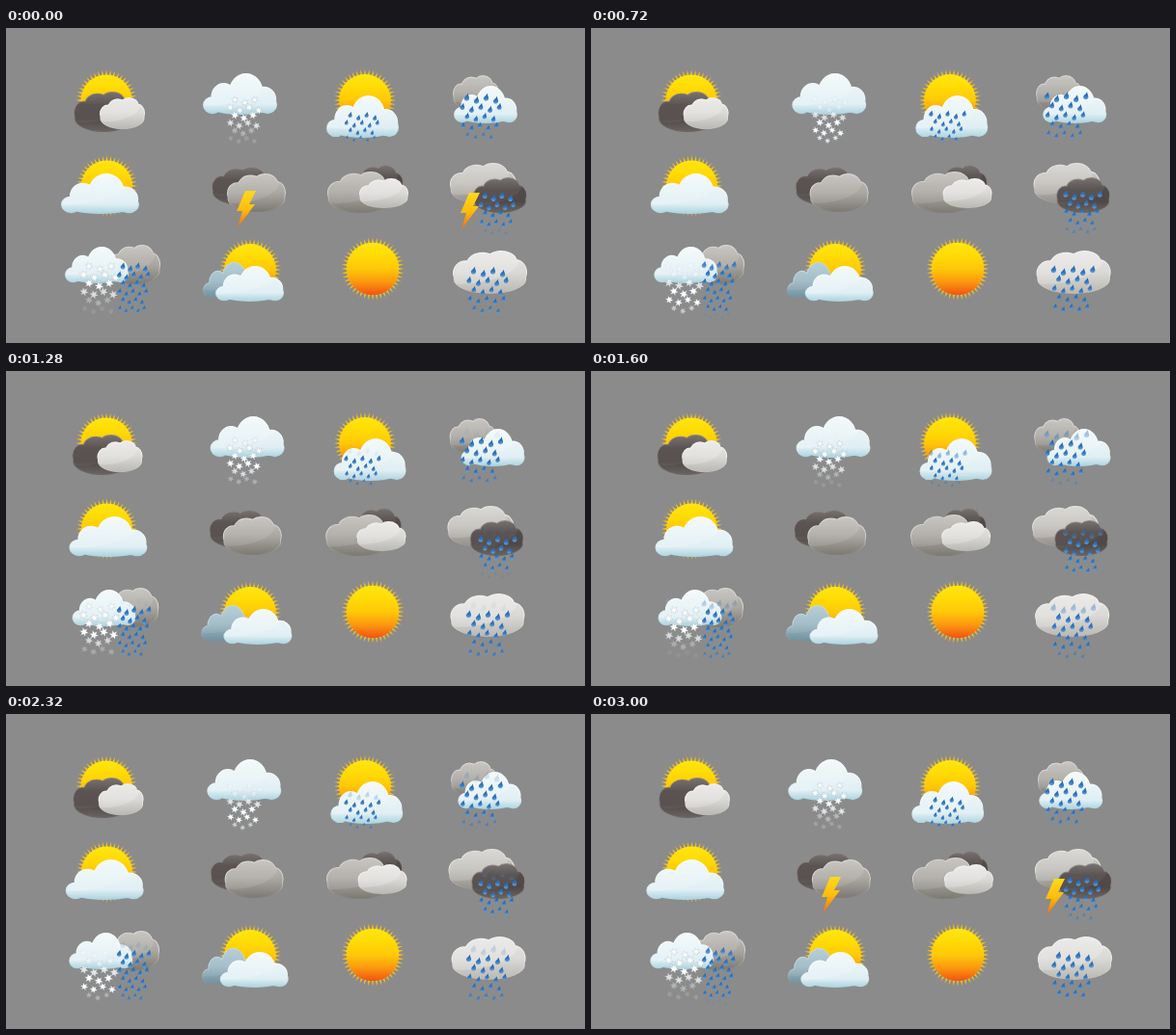
An HTML page with a canvas that plays this animation: 600 by 327 pixels, repeating every 3.04 s.

```html
<!DOCTYPE html>
<html lang="en">
<head>
<meta charset="utf-8">
<title>Weather icons</title>
<style>
html, body { margin: 0; width: 100%; height: 100%; overflow: hidden; background: #8b8b8b; }
canvas { display: block; }
</style>
</head>
<body>
<canvas id="stage" width="600" height="327"></canvas>
<script>
const ctx = document.getElementById('stage').getContext('2d');
const LOOP = 3040, STEP = 40, TAU = Math.PI * 2;

// Lobes of a cloud as fractions of its box: cx, cy, rx, ry
const FLAT = [
  [.58, .45, .23, .45], [.28, .57, .17, .34], [.82, .64, .17, .32],
  [.13, .77, .13, .21], [.87, .76, .13, .22], [.5, .77, .45, .23]
];
const PUFF = [
  [.5, .66, .49, .34], [.17, .52, .17, .29], [.4, .32, .22, .28],
  [.65, .27, .22, .27], [.84, .5, .16, .3]
];

const WHITE = { lobes: FLAT, rim: '#f8fcfd', fill: ['#f3f9fa', '#ebf5f7', '#e6f2f6', '#e0eff4', '#a9d2df'], gloss: .15 };
const BLUE = { lobes: FLAT, rim: '#c3d8e0', fill: ['#b0cbd5', '#9db9c5', '#708e9b'], gloss: .08 };
const DARK = { lobes: PUFF, rim: '#8b8582', fill: ['#726c69', '#524b4a', '#4f4847', '#6b6562'], gloss: .05 };
const MID = { lobes: PUFF, rim: '#dbd9d5', fill: ['#c3c0bb', '#aaa7a1', '#7c7973'], gloss: .1 };
const LIGHT = { lobes: PUFF, rim: '#e9e8e5', fill: ['#d3d1cd', '#bebbb6', '#918e88'], gloss: .16 };
const PALE = { lobes: PUFF, rim: '#f4f3f1', fill: ['#e7e6e4', '#dad9d6', '#b9b7b2'], gloss: .2 };

let time = 0, sway = 0;

function vertical(y0, y1, colors) {
  const g = ctx.createLinearGradient(0, y0, 0, y1);
  colors.forEach((c, i) => g.addColorStop(i / (colors.length - 1), c));
  return g;
}

function cloudPath(lobes, x, y, w, h, inset) {
  const path = new Path2D();
  for (const [cx, cy, rx, ry] of lobes) {
    const lobe = new Path2D();
    lobe.ellipse(x + cx * w, y + cy * h, rx * w - inset, ry * h - inset, 0, 0, TAU);
    path.addPath(lobe);
  }
  return path;
}

// Box at the left end of the swing; dx is the travel
function cloud(x, y, right, bottom, dx, style) {
  const w = right - x, h = bottom - y;
  x += dx * sway;
  ctx.fillStyle = vertical(y, bottom, [style.rim, style.rim, style.fill.at(-1)]);
  ctx.fill(cloudPath(style.lobes, x, y, w, h, 0));
  const body = cloudPath(style.lobes, x, y, w, h, .9);
  ctx.fillStyle = vertical(y, bottom, style.fill);
  ctx.fill(body);
  ctx.save();
  ctx.clip(body);
  ctx.fillStyle = `rgba(255,255,255,${style.gloss})`;
  ctx.beginPath();
  ctx.ellipse(x + w * .3, y + h * .35, w * .6, h * .4, -.15, 0, TAU);
  ctx.fill();
  ctx.restore();
}

function sun(cx, cy, r) {
  const rays = 44, disc = r * .84, half = .62 * Math.PI / rays;
  const at = (a, d) => ctx.lineTo(cx + d * Math.cos(a), cy + d * Math.sin(a));
  ctx.beginPath();
  for (let i = 0; i < rays; i++) {
    const a = i * TAU / rays - Math.PI / 2;
    at(a - half, disc - 1);
    at(a, r);
    at(a + half, disc - 1);
  }
  ctx.closePath();
  ctx.fillStyle = '#f8c414';
  ctx.fill();
  ctx.beginPath();
  ctx.arc(cx, cy, disc, 0, TAU);
  ctx.fillStyle = vertical(cy - disc, cy + disc, ['#ffe60e', '#ffdb05', '#ffc808', '#fb980f', '#f25212']);
  ctx.fill();
}

function bolt(x, y) {
  const phase = time * 3 / LOOP % 1;
  if (phase > .1 && phase < .82) return;
  ctx.beginPath();
  for (const [px, py] of [[10, 0], [21, 0], [14, 14], [20, 14], [2, 38], [7, 21], [1, 21]])
    ctx.lineTo(x + px, y + py);
  ctx.closePath();
  ctx.fillStyle = vertical(y, y + 38, ['#ffd91c', '#ffbd0b', '#f36c12']);
  ctx.fill();
}

function drop(x, y, s) {
  ctx.beginPath();
  ctx.moveTo(x + s * .3, y - s);
  ctx.bezierCurveTo(x + s * .4, y - s * .2, x + s * .75, y, x + s * .55, y + s * .5);
  ctx.bezierCurveTo(x + s * .3, y + s, x - s * .65, y + s * .9, x - s * .6, y + s * .2);
  ctx.bezierCurveTo(x - s * .55, y - s * .2, x, y - s * .4, x + s * .3, y - s);
  ctx.fillStyle = vertical(y - s, y + s, ['#245fa8', '#2f74bd', '#75aee2']);
  ctx.fill();
}

function star(x, y, r) {
  ctx.beginPath();
  for (let i = 0; i < 12; i++) {
    const a = i * Math.PI / 6 + .25, d = i % 2 ? r * .45 : r;
    ctx.lineTo(x + d * Math.cos(a), y + d * Math.sin(a));
  }
  ctx.closePath();
  ctx.fillStyle = '#fff';
  ctx.fill();
  ctx.strokeStyle = 'rgba(140,155,165,.45)';
  ctx.lineWidth = .5;
  ctx.stroke();
}

// Staggered rows that fall two rows per cycle
function fall(cx, top, bottom, width, cols, gap, cycles, paint) {
  const shift = time * cycles / LOOP % 1 * 2;
  const rows = Math.ceil((bottom - top) / gap);
  for (let i = -2; i <= rows; i++) {
    const y = top + (i + shift) * gap, u = (y - top) / (bottom - top);
    if (u <= 0 || u >= 1) continue;
    const n = cols - Math.abs(i % 2);
    for (let k = 0; k < n; k++) {
      const x = cx + (k - (n - 1) / 2) * width / (cols - 1) * (1 - .25 * u) - 3 * u;
      paint(x, y + (k % 2 ? 1.5 : -1.5), u);
    }
  }
  ctx.globalAlpha = 1;
}

function rain(cx, top, bottom, width, size) {
  fall(cx, top, bottom, width, 5, size * 2.3, 6, (x, y, u) => {
    ctx.globalAlpha = Math.min(1, u / .14, (1 - u) / .16);
    drop(x, y, size * (1.1 - .4 * u));
  });
}

function snow(cx, top, bottom, width, size) {
  const bright = .55 - .2 * Math.cos(time * 2 * TAU / LOOP);
  fall(cx, top, bottom, width, 4, size * 2, 2, (x, y, u) => {
    const wave = Math.max(.25, Math.min(1, 1.4 - 2.4 * Math.abs(u - bright)));
    ctx.globalAlpha = wave * Math.min(1, u / .08, (1 - u) / .08);
    star(x, y, size * (.75 + .35 * Math.sin(u * Math.PI)));
  });
}

function topRow() {
  sun(104, 75, 31.5);
  cloud(70, 66, 132, 108, -2, DARK);
  cloud(97, 72, 144, 105, -3, PALE);

  cloud(204, 47, 281, 90, 9, WHITE);
  snow(248, 68, 119, 32, 4);

  sun(372, 75, 32);
  cloud(332, 70, 407, 114, 9, WHITE);
  rain(370, 84, 120, 36, 3.4);

  cloud(463, 49, 511, 86, -4, MID);
  cloud(464, 60, 530, 99, 9, WHITE);
  rain(493, 64, 118, 42, 4.2);
}

function middleRow() {
  sun(104.5, 164, 31.5);
  cloud(57, 151, 138, 193, 10, WHITE);

  cloud(213, 144, 277, 184, -3, DARK);
  cloud(229, 151, 290, 191, -5, MID);
  bolt(238, 169);

  cloud(359, 142, 412, 180, -2, DARK);
  cloud(333, 149, 402, 192, -2, MID);
  cloud(366, 156, 417, 187, -3, PALE);

  cloud(460, 140, 529, 183, -3, LIGHT);
  cloud(484, 155, 540, 192, -4, DARK);
  bolt(470, 171);
  rain(510, 166, 214, 37, 4);
}

function bottomRow() {
  cloud(106, 225, 160, 266, -2, MID);
  cloud(61, 227, 127, 265, 9, WHITE);
  snow(98, 240, 295, 36, 4.4);
  rain(133, 240, 301, 32, 3.8);

  sun(253, 251, 32);
  cloud(204, 243, 260, 281, -2, BLUE);
  cloud(217, 247, 288, 284, 10, WHITE);

  sun(380, 250, 32.5);

  cloud(463, 231, 540, 276, -3, PALE);
  rain(500, 244, 300, 42, 4.2);
}

function draw(now) {
  time = Math.floor(now % LOOP / STEP) * STEP;
  sway = 1 - Math.abs(1 - time * 2 / LOOP);
  ctx.fillStyle = '#8b8b8b';
  ctx.fillRect(0, 0, 600, 327);
  topRow();
  middleRow();
  bottomRow();
  requestAnimationFrame(draw);
}

draw(0);
</script>
</body>
</html>
```
